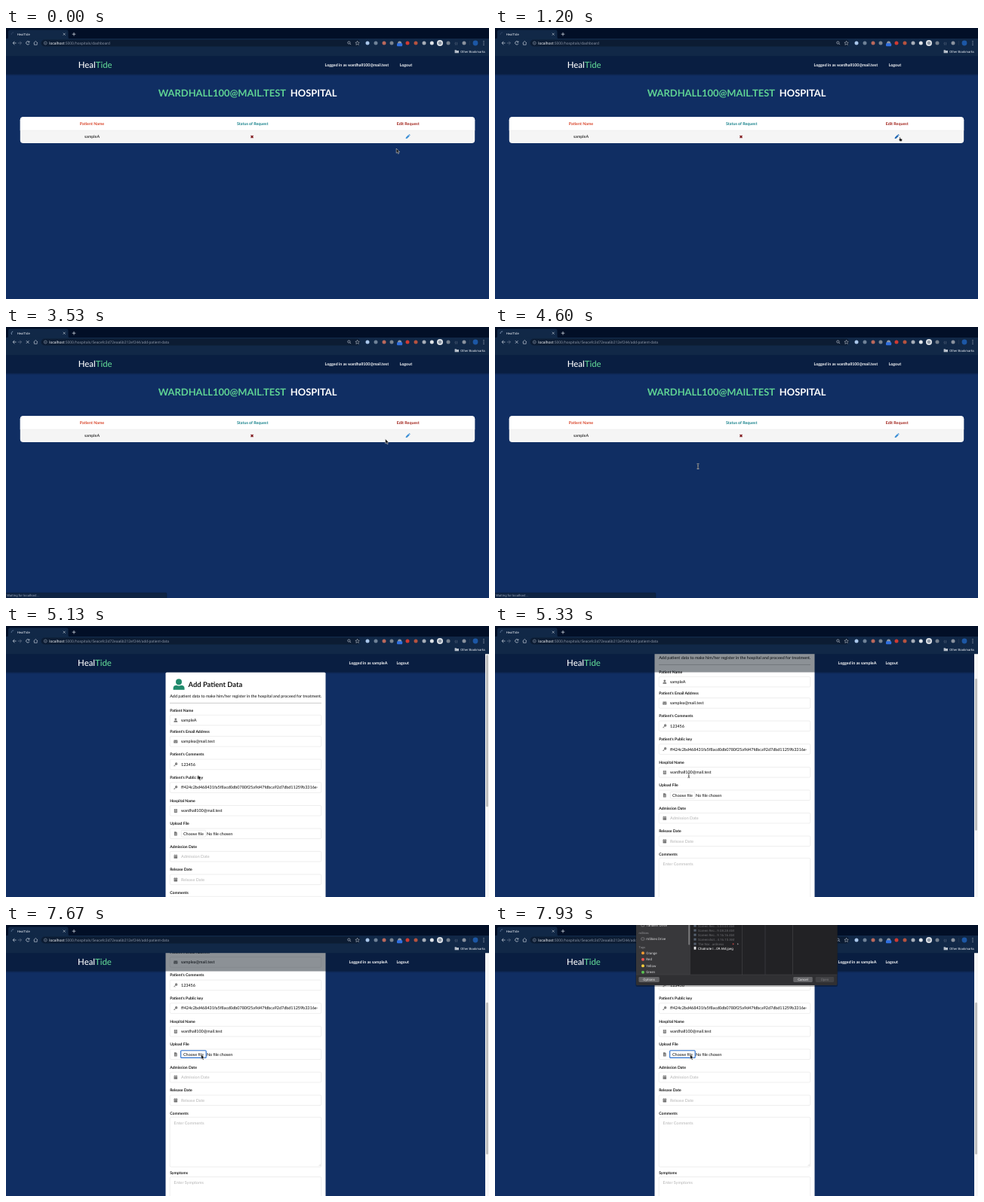
An HTML page for the animation above (8000 ms loop, 640 by 360 pixels).

```html
<!DOCTYPE html>
<html lang="en">
<head>
<meta charset="utf-8">
<title>Patient requests</title>
<style>
html, body { margin: 0; width: 100%; height: 100%; overflow: hidden; background: #102e63; }
svg { display: block; width: 100vw; height: 100vh; }
text { white-space: pre; text-rendering: geometricPrecision; }
.page { font-family: Lato, "Open Sans", sans-serif; font-weight: 500; }
.ui { font-family: Roboto, Inter, sans-serif; }
</style>
</head>
<body>
<svg id="stage" viewBox="0 0 640 360" xmlns="http://www.w3.org/2000/svg"></svg>
<script>
const LOOP = 8000, FPS = 15;
const BRAND = ["Heal", "Tide"], USER = "sampleA", CLINIC = "wardhall100@mail.test";
const HOST = "localhost", DASH = ":5000/hospitals/dashboard",
  ADD = ":5000/hospitals/5eacefc3d72eaa6b212ef244/add-patient-data";
const GREEN = "#5fd394", INK = "#161616", HINT = "#b9b9b9", GRAY = "#777", BODY = 5.45;

const text = (x, y, s, size, fill, more = "") =>
  `<text x="${x}" y="${y}" font-size="${size}" fill="${fill}" ${more}>${s}</text>`;
const rect = (x, y, w, h, fill, more = "") =>
  `<rect x="${x}" y="${y}" width="${w}" height="${h}" fill="${fill}" ${more}/>`;
const dot = (x, y, r, fill, more = "") => `<circle cx="${x}" cy="${y}" r="${r}" fill="${fill}" ${more}/>`;
const line = (d, color, w = 0.7, more = "") =>
  `<path d="${d}" fill="none" stroke="${color}" stroke-width="${w}" ${more}/>`;
const shape = (d, fill, more = "") => `<path d="${d}" fill="${fill}" ${more}/>`;
const group = (id, body, more = "") => `<g id="${id}" ${more}>${body}</g>`;
const BOLD = 'font-weight="700"', MID = 'text-anchor="middle"';

// Dashboard
function dashboard() {
  const heads = [[114, "Patient Name", "#d9452a"], [326.7, "Status of Request", "#15808a"], [532.7, "Edit Request", "#a02018"]];
  return text(201.7, 90.6, CLINIC.toUpperCase(), 12.9, GREEN, BOLD) +
    text(376.8, 90.6, "HOSPITAL", 12.9, "#fff", BOLD) +
    rect(18.8, 118.2, 602.4, 34.9, "#f5f5f5", 'rx="4"') +
    shape("M18.8 136V122.2a4 4 0 0 1 4-4H617.2a4 4 0 0 1 4 4V136Z", "#fff") +
    line("M18.8 136H621.2", "#e6e6e6", 0.4) +
    heads.map(([x, s, c]) => text(x, 128.8, s, 5.33, c, BOLD + MID)).join("") +
    text(114, 146.3, USER, 5.33, INK, MID) +
    line("M324.5 143L327.5 146M327.5 143L324.5 146", "#7d1418", 1.4) +
    group("pencil", shape("M529.6 147.1L530 145.2L533.2 142L534.8 143.6L531.6 146.8ZM533.6 141.6L534.1 141.2Q534.6 140.9 535 141.4L535.5 142Q535.8 142.4 535.4 142.8L535.1 143.1Z", "currentColor"));
}

// Form
const icons = {
  user: dot(0, -1.3, 1.4, GRAY) + shape("M-2.5 2.6Q-2.5 .4 -.8 .4H.8Q2.5 .4 2.5 2.6Z", GRAY),
  mail: rect(-2.6, -2, 5.2, 4, GRAY, 'rx=".5"') + line("M-2.6 -.9L0 .8L2.6 -.9", "#fff", 0.4),
  key: dot(0.9, -0.9, 1.7, GRAY) + dot(1.4, -1.4, 0.45, "#fff") + line("M.1 -.1L-2.3 2.3M-1.7 1.7L-.9 2.5", GRAY, 1),
  clinic: rect(-2, -2.2, 4, 4.9, GRAY) + line("M-1.2 -.2H1.2M-1.2 1.1H1.2M0 -1.9V-.8M-.6 -1.35H.6", "#fff", 0.45),
  file: shape("M-1.9 -2.6H.5L1.9 -1.2V2.6H-1.9Z", GRAY) + line("M-1 .2H1M-1 1.3H1", "#fff", 0.4),
  date: rect(-2.3, -2, 4.6, 4.6, GRAY, 'rx=".4"') + line("M-2.3 -.6H2.3", "#fff", 0.4) + line("M-1.2 -2.7V-1.5M1.2 -2.7V-1.5", GRAY)
};
const box = (y, h) => rect(217.2, y, 200.6, h, "#fff", 'rx="1.6" stroke="#dcdcdc" stroke-width=".5"');
const label = (y, s) => text(217.2, y + 1.7, s, 5.1, INK, BOLD);

function field(y, name, icon, value, hint) {
  return label(y, name) + box(y + 6.4, 13.6) +
    `<g transform="translate(224.8 ${y + 13.2})">${icons[icon]}</g>` +
    text(232, y + 15.1, value || hint || "", BODY, value ? INK : HINT, 'clip-path="url(#inputs)"');
}
function area(y, name, hint) {
  const b = y + 71;
  return label(y, name) + box(y + 5.2, 66) + text(222.6, y + 15.1, hint, BODY, HINT) +
    line(`M414.5 ${b - 1}L417 ${b - 3.5}M416 ${b - 1}L417 ${b - 2}`, "#999", 0.3);
}
function form() {
  const key = "ff424c2bd468431fa5f8acd0db0780f25a9d47fdbca92d7dbd11259b3316e4";
  return rect(211.5, 62, 212, 480, "#fff", 'rx="1.6"') +
    dot(229, 74.6, 4, "#218a6c") +
    shape("M221.6 85.2V83.2Q221.6 79.2 226 79.2Q229 80.4 232 79.2Q236.5 79.2 236.5 83.2V85.2Z", "#218a6c") +
    text(241.6, 81, "Add Patient Data", 9.4, INK, BOLD) +
    text(217.2, 95.2, "Add patient data to make him/her register in the hospital and proceed for treatment.", BODY, INK) +
    line("M217 102.8H418", "#a9a9a9", 0.6) +
    field(112.3, "Patient Name", "user", USER) +
    field(140.6, "Patient's Email Address", "mail", USER.toLowerCase() + "@mail.test") +
    field(171.1, "Patient's Comments", "key", "123456") +
    field(201.8, "Patient's Public key", "key", key) +
    field(232.5, "Hospital Name", "clinic", CLINIC) +
    field(263, "Upload File", "file") +
    rect(232.3, 271.7, 32.4, 8.8, "#fff", 'rx="1" stroke="#d2d2d2" stroke-width=".4"') +
    group("ring", rect(231.6, 271.2, 33.6, 9.6, "none", 'rx="1" stroke="#2e73d2" stroke-width="1.1"')) +
    text(235, 278.1, "Choose file", BODY, INK) + text(266, 278.1, "No file chosen", BODY, INK) +
    field(293.4, "Admission Date", "date", "", "Admission Date") +
    field(324, "Release Date", "date", "", "Release Date") +
    area(354.5, "Comments", "Enter Comments") + area(433.8, "Symptoms", "Enter Symptoms");
}

const nav = (id, x, who, whoX, outX) => group(id,
  text(x, 52.7, `${BRAND[0]}<tspan fill="${GREEN}">${BRAND[1]}</tspan>`, 11.4, "#fff") +
  text(whoX, 50.5, "Logged in as " + who, 5.33, "#fff", BOLD) + text(outX, 50.5, "Logout", 5.33, "#fff", BOLD));

// Browser frame
function browser() {
  const marks = [[479, "#a9c6ea"], [490, "#6f8298"], [501, "#b9685c"], [511, "#7b8490"], [521.6, "#8b95a3"], [532, "#d03a32"],
    [543, "#b5523f"], [554, "#a6adb8"], [564.3, "#dfe3e8"], [586, "#75808e"], [607, "#8a929e"]];
  return rect(0, 0, 640, 14.5, "#020f27") + rect(0, 14, 640, 23.2, "#112847") +
    shape("M1 14.5Q3 14.5 3 12V5Q3 2.5 5.5 2.5H80Q82.5 2.5 82.5 5V12Q82.5 14.5 84.5 14.5Z", "#112847") +
    text(14.8, 9.8, BRAND.join(""), 4.25, "#e8ecf2") +
    line("M75.7 6.7L78.7 9.7M78.7 6.7L75.7 9.7", "#cfd6e0", 0.6) +
    line("M87.7 8.2H92.3M90 5.9V10.5", "#dfe5ee", 0.7) +
    group("spin", line("M-2.4 .6A2.5 2.5 0 0 1 .6 -2.4", "currentColor", 0.7)) +
    line("M13.5 20H9.4M11.3 17.8L9.1 20L11.3 22.2", "#d5dbe5") +
    line("M15.8 20H20.4M18.3 17.8L20.5 20L18.3 22.2", "#6c7a90") +
    group("reload", line("M30.6 18.5A2.2 2.2 0 1 0 30.9 20.7M30.9 17.4V19H29.3", "#d5dbe5")) +
    group("stop", line("M26.9 18.2L30.5 21.8M30.5 18.2L26.9 21.8", "#d5dbe5")) +
    line("M36.6 20L39.3 17.5L42 20M37.4 19.6V22.3H41.2V19.6", "#d5dbe5", 0.6) +
    rect(46.5, 15.6, 423, 8.8, "#0c1c33", 'rx="4.4"') +
    dot(52.3, 20, 2, "none", 'stroke="#a9b3c2" stroke-width=".5"') + line("M52.3 19.7V21.1M52.3 18.8V19.2", "#a9b3c2", 0.5) +
    text(57.2, 21.7, `${HOST}<tspan id="path" fill="#8791a3"></tspan>`, 4.98, "#f2f5f9") +
    dot(454.4, 19.5, 1.6, "none", 'stroke="#d0d6df" stroke-width=".6"') + line("M455.6 20.7L457 22.1", "#d0d6df") +
    shape("M465.6 17.3L466.4 19.1L468.3 19.3L466.9 20.6L467.3 22.5L465.6 21.5L463.9 22.5L464.3 20.6L462.9 19.3L464.8 19.1Z", "none", 'stroke="#d0d6df" stroke-width=".5"') +
    marks.map(([x, c]) => dot(x, 20, 2.5, c)).join("") +
    rect(518, 20.2, 7.2, 4, "#2f6fe0", 'rx="1"') +
    dot(575, 20, 4, "#dfe3e8") + dot(575, 20, 2.3, "#8d97a5") +
    text(596.5, 21.5, "{ }", 4.2, "#8a94a3", MID) + line("M614.5 17V23", "#33455f", 0.4) +
    dot(622, 20, 3.4, "#1c57a5") + [17.8, 20, 22.2].map(y => dot(633, y, 0.55, "#d5dbe5")).join("") +
    shape("M594.6 29.2H596.6L597.3 30H600V33.2H594.6Z", "#b7bfca") +
    text(602.2, 32.7, "Other Bookmarks", 4.25, "#e3e8ef");
}

// File chooser, drawn with its lower edge at y = 80
function sheet() {
  const tags = [["Orange", "#f49b32"], ["Red", "#ef5350"], ["Yellow", "#f3cb3c"], ["Green", "#5cc452"]];
  const files = ["Screen Rec...5.03.03 AM", "Screen Rec...9.08.28 AM", "Screen Rec...9.16.16 AM", "Screenshot...4.16.15 AM", "The Nor...ardness"];
  const button = (x, w, s, fill, ink) => rect(x, 69, w, 7, fill, 'rx="1.4"') + text(x + w / 2, 74.1, s, 4.5, ink, MID);
  const side = (y, s) => text(200.3, y, s, 4.5, "#d8d8da") + rect(193.8, y - 3.3, 4, 3.2, "none", 'rx=".8" stroke="#a7a7ab" stroke-width=".5"');
  return rect(186.4, -60, 267.8, 142, "#000", 'rx="2" opacity=".3"') +
    rect(187, -60, 266.4, 140, "#303033", 'rx="1.6"') +
    rect(187, -60, 72, 126, "#38383b") + rect(259, -60, 194.4, 126, "#222225") +
    side(2, "Tandem Drive") + text(190.5, 12.2, "mSkies", 4, "#929296") + side(20.2, "mSkies Drive") +
    text(190.5, 31, "Tags", 4, "#929296") +
    tags.map(([s, c], i) => dot(196, 37.2 + i * 8.5, 2, c) + text(200.3, 38.8 + i * 8.5, s, 4.5, "#d8d8da")).join("") +
    rect(256.2, -40, 2, 66.5, "#77777a", 'rx="1"') +
    files.map((s, i) => rect(263.4, -.4 + i * 6, 3.2, 3, "#56616f") + text(269, 2.8 + i * 6, s, 4.4, "#6c6c70")).join("") +
    dot(315.6, 25.2, 1, "#b24343") + shape("M321 24L323 25.2L321 26.4Z", "#8a8a8d") +
    rect(263.6, 28.8, 2.8, 3.8, "#e4e4e6") + text(269, 32.6, "Chatnote I...09 AM.jpeg", 4.5, "#fff") +
    line("M327.5 -60V66M358 -60V66M394.5 -60V66", "#3e3e42", 0.8) + line("M187 66H453.4", "#47474a", 0.5) +
    button(190.4, 27.4, "Options", "#656568", "#f3f3f3") + button(395.2, 25.6, "Cancel", "#656568", "#f3f3f3") +
    button(424.6, 24.6, "Open", "#424245", "#7b7b7e");
}

const BEAM = "M-1.4 -3.3Q0 -3.3 0 -2.2V2.2Q0 3.3 -1.4 3.3M1.4 -3.3Q0 -3.3 0 -2.2M0 2.2Q0 3.3 1.4 3.3M-.8 1H.8";
const pointers = {
  arrow: shape("M0 0V6.2L1.4 4.9L2.4 7.2L3.5 6.7L2.5 4.5H4.4Z", "#111", 'stroke="#e8e8e8" stroke-width=".5"'),
  hand: shape("M0 .2Q.6 -.3 1 .3L1.4 2L3.1 2.5Q3.6 2.7 3.5 3.4L3 5.4H.6L-1 3.3Q-.9 2.6 0 3Z", "#151515", 'stroke="#eee" stroke-width=".5"'),
  beam: line(BEAM, "#eee", 1.3, 'opacity=".8"') + line(BEAM, "#222", 0.6)
};

const stage = document.getElementById("stage");
stage.innerHTML = `<defs>
  <clipPath id="inputs"><rect x="217" y="100" width="195.4" height="400"/></clipPath>
  <linearGradient id="shade" x2="0" y2="1"><stop stop-color="#000" stop-opacity=".2"/><stop offset="1" stop-color="#000" stop-opacity="0"/></linearGradient>
  </defs>` + rect(0, 0, 640, 360, "#102e63") + rect(0, 61.5, 640, 2.5, "url(#shade)") +
  `<g class="page">` + group("dash", dashboard()) + group("form", form()) +
  rect(0, 37, 640, 24.5, "#000c18", 'opacity=".45"') +
  nav("navA", 95.8, CLINIC, 422.6, 521.7) + nav("navB", 95.1, USER, 454.6, 517.4) + `</g><g class="ui">` +
  group("bar", rect(635, 37, 5, 323, "#f7f7f7") + rect(636, 37.6, 3, 202, "#bdbdbd", 'id="thumb" rx="1.5"')) +
  browser() +
  group("bubble", rect(-2, 353, 141, 9, "#0f2443", 'id="plate" rx="1.4" stroke="#0a1c3a" stroke-width=".4"') +
    text(1.3, 358.1, "", 4.27, "#9aa6b8", 'id="status"')) +
  group("sheet", sheet()) + `</g>` +
  group("cursor", Object.entries(pointers).map(([k, v]) => group(k, v)).join(""));

const $ = id => document.getElementById(id);
const show = (id, on) => $(id).setAttribute("display", on ? "inline" : "none");
const move = (id, x, y) => $(id).setAttribute("transform", `translate(${x} ${y})`);
const part = (t, a, b) => Math.min(1, Math.max(0, (t - a) / (b - a)));
const smooth = u => u * u * (3 - 2 * u);

const track = [[0, 517.2, 160], [70, 517.2, 160], [800, 536, 145], [2000, 536, 145], [2330, 534.4, 144.6],
  [3350, 534.4, 144.6], [4200, 269, 178.5], [4300, 269, 179], [4600, 269, 185], [5070, 254, 198], [5330, 256.8, 198.3],
  [5950, 256.8, 199], [6530, 258, 172], [7600, 258, 172], [7670, 258.6, 172], [8000, 258.6, 172]];
const kinds = [[0, "arrow"], [730, "hand"], [3450, "arrow"], [4250, "beam"], [5000, "arrow"], [5190, "beam"], [6050, "arrow"]];
const CLICK = 3060, LOADED = 4860;

function place(t) {
  const i = Math.max(1, track.findIndex(k => k[0] >= t));
  const [a, x, y] = track[i - 1], [b, X, Y] = track[i], u = smooth(part(t, a, b));
  return [x + (X - x) * u, y + (Y - y) * u];
}

function render(t) {
  const clicked = t >= CLICK, loaded = t >= LOADED, loading = clicked && !loaded;
  show("dash", !loaded); show("navA", !loaded);
  show("form", loaded); show("navB", loaded); show("bar", loaded);

  const scroll = 105 * (1 - (1 - part(t, 5130, 5930)) ** 2.33);
  move("form", 0, 0.6 - scroll);
  move("thumb", 0, scroll * 0.62);
  show("ring", t >= 6900);
  $("pencil").style.color = t >= 1060 && t < 3450 ? "#1c66b4" : "#3b8fd6";

  $("path").textContent = clicked ? ADD : DASH;
  show("stop", loading); show("reload", !loading);
  $("spin").setAttribute("transform", `translate(9.6 8.4) rotate(${loading ? (t - 4600) * 0.36 : 0})`);
  $("spin").style.color = loading ? "#9db4d4" : loaded ? "#6d86ab" : "#3a4f70";

  show("bubble", t >= 2520 && !loaded);
  $("bubble").setAttribute("opacity", 0.7 + 0.3 * part(t, 2530, 2700));
  $("plate").setAttribute("width", clicked ? 215 : 141);
  $("status").textContent = clicked ? "Waiting for localhost..." : HOST + ADD;

  const drop = part(t, 7830, 7930);
  show("sheet", drop > 0);
  move("sheet", 0, 80 * drop - 80);

  const kind = kinds.filter(k => k[0] <= t).pop()[1];
  for (const k in pointers) show(k, k === kind);
  move("cursor", ...place(t));
}

// Each picture holds for one fifteenth of a second, like a screen recording
function tick() {
  const t = performance.now() % LOOP;
  render(Math.min(LOOP, Math.floor((t + 5) * FPS / 1000) * 1000 / FPS));
  requestAnimationFrame(tick);
}
tick();
</script>
</body>
</html>
```
